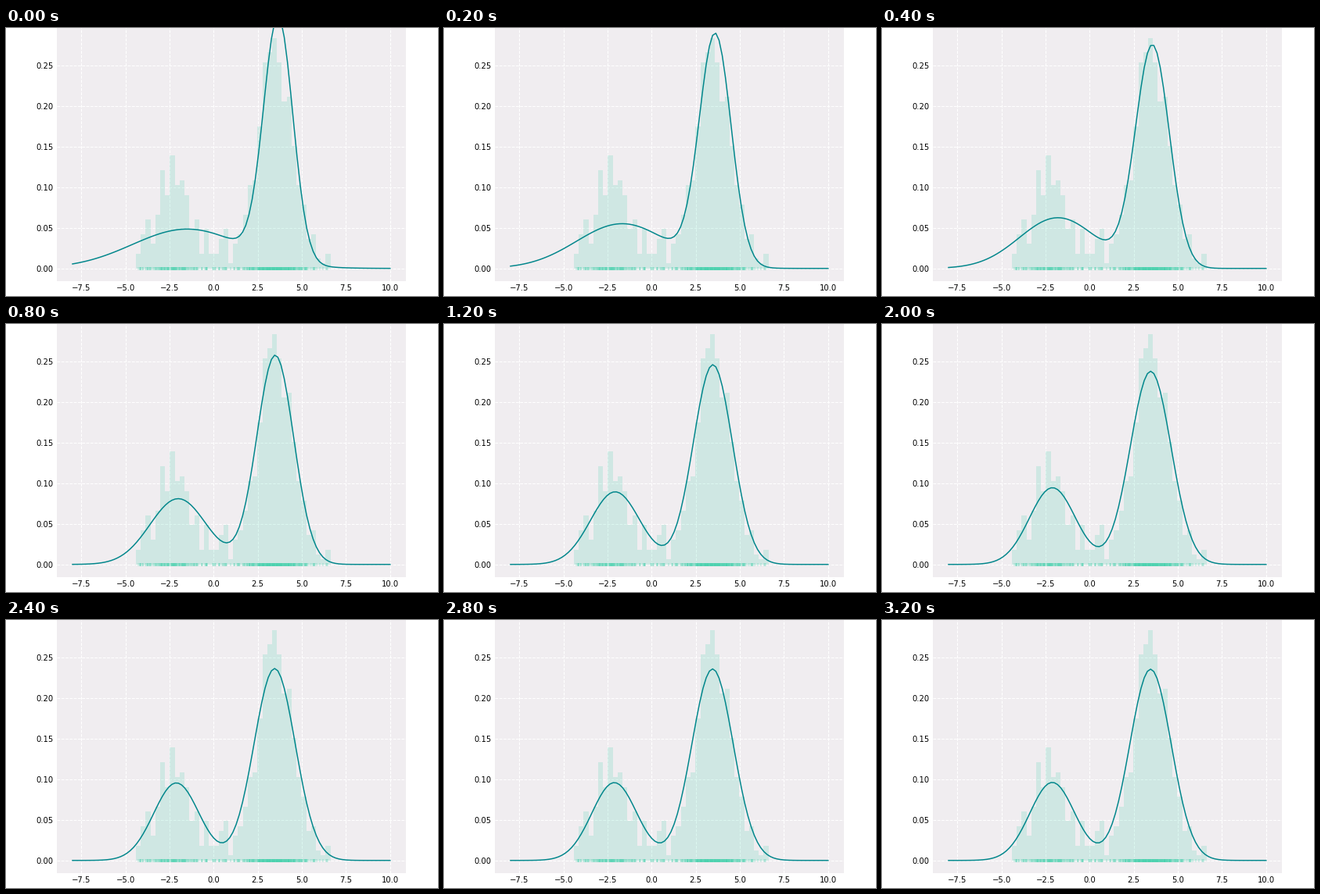
A matplotlib script for the animation above (3400 ms loop, 552 px wide and 343 px high).

```python
import numpy as np
import matplotlib.pyplot as plt
from matplotlib.animation import FuncAnimation

W, H, DPI = 552, 343, 72
FRAMES, STEP_MS = 17, 200
MINT, TEAL, PANEL = "#4bd2af", "#00868b", "#f0edf0"
LEFT, WIDTH, BOTTOM = 64.7, 446.4, 324
ZERO_Y, Y_SCALE = 307.7, 1038.8

# Sample: points spread at random inside each histogram bin.
COUNTS = np.array([3, 7, 10, 5, 11, 20, 15, 23, 17, 18, 15, 8, 10, 3, 8, 3, 3,
                   6, 8, 1, 5, 7, 11, 17, 18, 29, 42, 44, 47, 42, 34, 35, 25,
                   17, 13, 6, 7, 2, 1, 3])
EDGES = np.linspace(-4.41, 6.62, len(COUNTS) + 1)
BIN = EDGES[1] - EDGES[0]
rng = np.random.default_rng(5)
sample = np.repeat(EDGES[:-1], COUNTS) + BIN * rng.random(COUNTS.sum())

# Two-component fit settling over the iterations.
KEY_STEPS = np.array([0, 2, 4, 6, 8, 12, 16])
WEIGHT = [0.379, 0.343, 0.325, 0.314, 0.310, 0.3077, 0.306]
MEAN_L = [-1.50, -1.80, -2.01, -2.07, -2.10, -2.115, -2.12]
MEAN_R = [3.66, 3.56, 3.49, 3.47, 3.46, 3.455, 3.45]
SIGMA_L = [3.12, 2.19, 1.60, 1.40, 1.33, 1.285, 1.27]
SIGMA_R = [0.83, 0.961, 1.045, 1.112, 1.144, 1.168, 1.175]


def settle(step, values):
    """Interpolate between key values along an exponential decay."""
    return np.interp(-np.exp(-step / 4), -np.exp(-KEY_STEPS / 4), values)


def gauss(x, mean, sigma):
    return np.exp(-((x - mean) / sigma) ** 2 / 2) / (sigma * np.sqrt(2 * np.pi))


def mixture(x, step):
    w, ml, mr, sl, sr = (settle(step, v) for v in
                         (WEIGHT, MEAN_L, MEAN_R, SIGMA_L, SIGMA_R))
    return w * gauss(x, ml, sl) + (1 - w) * gauss(x, mr, sr)


fig = plt.figure(figsize=(W / DPI, H / DPI), dpi=DPI, facecolor="white")
ax = fig.add_axes([LEFT / W, 1 - BOTTOM / H, WIDTH / W, BOTTOM / H], facecolor=PANEL)
ax.set_xlim(-8.9, 10.9)
ax.set_ylim((ZERO_Y - BOTTOM) / Y_SCALE, ZERO_Y / Y_SCALE)
ax.set_xticks(np.arange(-7.5, 10.1, 2.5))
ax.set_yticks(np.arange(0, 0.26, 0.05))
ax.xaxis.set_major_formatter("{x:.1f}")
ax.yaxis.set_major_formatter("{x:.2f}")
ax.tick_params(length=0, pad=4, labelsize=10, labelfontfamily="DejaVu Sans")
ax.set_axisbelow(True)
ax.grid(color="white", linestyle="--", linewidth=1)
for spine in ax.spines.values():
    spine.set_visible(False)

ax.bar(EDGES[:-1], COUNTS / (600 * BIN), BIN, align="edge", color=MINT, alpha=0.2)
ax.vlines(sample, -0.0025, 0.0013, color=MINT, alpha=0.2, linewidth=2)
grid = np.linspace(-8, 10, 100)
curve, = ax.plot([], [], color=TEAL, linewidth=1.5)


def draw(step):
    curve.set_data(grid, mixture(grid, step))
    return curve,


anim = FuncAnimation(fig, draw, frames=FRAMES, interval=STEP_MS, repeat=True,
                     repeat_delay=0, blit=False)
plt.show()
```
